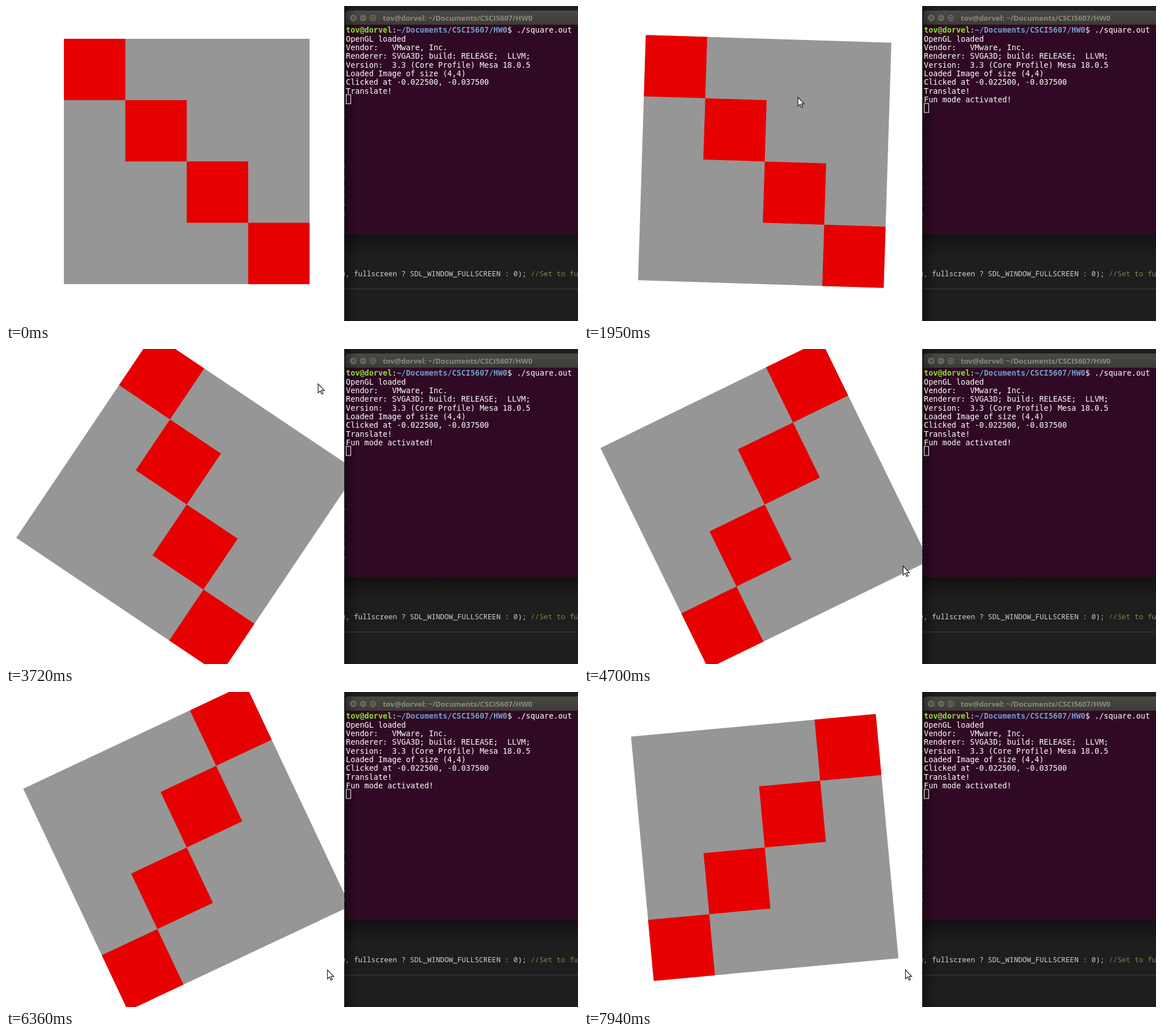
Recreate the animation shown at these times as an HTML page. Size 1008 px wide and 556 px high, loop 7990 ms.

```html
<!DOCTYPE html>
<html lang="en">
<head>
<meta charset="utf-8">
<title>Spinning square</title>
<style>
  html, body { margin: 0; width: 100%; height: 100%; overflow: hidden; background: #1e1e1e; }
  svg { display: block; width: 1008px; height: 556px; }
  text { white-space: pre; }
  .term { font: 13.5px "DejaVu Sans Mono", monospace; fill: #fff; }
  .user { font-weight: bold; fill: #8ae234; }
  .path { font-weight: bold; fill: #729fcf; }
  .title { font: 700 12.9px "Open Sans", sans-serif; fill: #8b8981; }
  .code { font: 12.68px "Noto Sans Mono", monospace; fill: #d4d4d4; }
</style>
</head>
<body>
<svg viewBox="0 0 1008 556">
  <defs>
    <linearGradient id="bar" x2="0" y2="1">
      <stop offset="0" stop-color="#4a4944"/>
      <stop offset="1" stop-color="#3c3b37"/>
    </linearGradient>
    <linearGradient id="below" x2="0" y2="1">
      <stop offset="0" stop-opacity=".4"/>
      <stop offset="1" stop-opacity="0"/>
    </linearGradient>
    <linearGradient id="beside">
      <stop offset="0" stop-opacity=".35"/>
      <stop offset="1" stop-opacity="0"/>
    </linearGradient>
    <clipPath id="view"><rect width="596" height="556"/></clipPath>
  </defs>

  <!-- editor behind the windows -->
  <rect x="596" width="412" height="556" fill="#1e1e1e"/>
  <rect x="596" y="403" width="412" height="40" fill="url(#below)"/>
  <path d="M596 499.5H1008" stroke="#444"/>
  <path d="M596 195.5h2M596 267h1M596 285l2 -4M596 302h2M596 321.5h2M596 337h2M596 353l2 -4M596 370l2 -4" stroke="#777"/>
  <text class="code" x="590.2" y="476.5">w, fullscreen ? SDL_WINDOW_FULLSCREEN : <tspan fill="#b5cea8">0</tspan>); <tspan fill="#6f8f4c">//Set to fullscreen</tspan></text>

  <!-- terminal -->
  <path d="M598 34V14q0 -6 6 -6H1008V34Z" fill="url(#bar)"/>
  <rect x="598" y="33" width="410" height="370" fill="#300a24"/>
  <rect x="596" width="24" height="556" fill="url(#beside)"/>
  <g fill="#69675f" stroke="#3a3934" stroke-width=".8">
    <circle cx="612" cy="21" r="6.3"/>
    <circle cx="629.3" cy="21" r="6.3"/>
    <circle cx="646.5" cy="21" r="6.3"/>
  </g>
  <path d="M609.500 18.500l5 5m0 -5l-5 5M626.300 21h6M644 18.500h5v5h-5z" fill="none" stroke="#3a3934" stroke-width="1.2"/>
  <text class="title" x="664" y="26.400">tov@dorvel: ~/Documents/CSCI5607/HW0</text>
  <g id="lines" class="term">
    <text x="599" y="47.300"><tspan class="user">tov@dorvel</tspan>:<tspan class="path">~/Documents/CSCI5607/HW0</tspan>$ ./square.out</text>
  </g>
  <rect id="caret" x="599.500" width="8" height="16" fill="none" stroke="#fff"/>

  <!-- drawing window -->
  <rect width="596" height="556" fill="#fff"/>
  <g clip-path="url(#view)">
    <g id="square"></g>
  </g>
  <path id="mouse" d="M.5 .5V16.500L4.300 13L6.800 18.800L9.200 17.800L6.700 12.200H11.500Z" fill="#fff" stroke="#1a1a1a" stroke-width="1.2"/>
</svg>
<script>
const LOOP = 7990, FUN = 1410;
const CENTER = [318.5, 274.4], CELL = 108.25;
const byId = id => document.getElementById(id);

function add(parent, tag, attrs, text = "") {
  const el = document.createElementNS("http://www.w3.org/2000/svg", tag);
  for (const name in attrs) el.setAttribute(name, attrs[name]);
  el.textContent = text;
  parent.appendChild(el);
  return el;
}

// Each key: time, steps taken since the previous key, values.
const spin = [
  [FUN, 1, 0], [1950, 12, 181.8], [2740, 17, 356.3], [3720, 21, 573.9],
  [5570, 40, 974.05], [7150, 34, 1315.5], [7940, 17, 1524.7]
];
const pointer = [
  [70, 1, 846, 458], [400, 7, 444, 17],
  [1030, 1, 413, 19], [1260, 5, 378, 149], [FUN, 1, 378, 149],
  [1950, 12, 376.5, 160.5], [2740, 17, 372, 211.5], [3720, 21, 549.5, 61],
  [5000, 28, 566, 490]
];

function sample(keys, t) {
  const i = keys.findIndex(key => key[0] > t);
  if (i === 0) return keys[0].slice(2);
  if (i < 0) return keys[keys.length - 1].slice(2);
  const a = keys[i - 1], b = keys[i];
  const k = Math.floor((t - a[0]) / (b[0] - a[0]) * b[1] + 1e-6) / b[1];
  return a.slice(2).map((v, n) => v + (b[n + 2] - v) * k);
}

const lines = [
  "OpenGL loaded",
  "Vendor:   VMware, Inc.",
  "Renderer: SVGA3D; build: RELEASE;  LLVM;",
  "Version:  3.3 (Core Profile) Mesa 18.0.5",
  "Loaded Image of size (4,4)",
  "Clicked at -0.022500, -0.037500",
  "Translate!",
  "Fun mode activated!"
].map((s, i) => add(byId("lines"), "text", { x: 599, y: 47.3 + 15.35 * (i + 1) }, s));
const funLine = lines[lines.length - 1];

const square = byId("square"), mouse = byId("mouse"), caret = byId("caret");
add(square, "rect", { x: -2 * CELL, y: -2 * CELL, width: 4 * CELL, height: 4 * CELL, fill: "#969696" });
for (let i = -2; i < 2; i++) {
  add(square, "rect", { x: i * CELL, y: i * CELL, width: CELL, height: CELL, fill: "#e60000" });
}

function draw(t) {
  const fun = t >= FUN;
  square.setAttribute("transform", `translate(${CENTER}) rotate(${sample(spin, t)})`);
  funLine.style.display = fun ? "" : "none";
  caret.setAttribute("y", fun ? 172 : 156.6);
  const shown = t >= 70 && t < 440 || t >= 1030;
  mouse.style.display = shown ? "" : "none";
  mouse.setAttribute("transform", `translate(${sample(pointer, t)})`);
}

const start = performance.now();
function tick() {
  draw((performance.now() - start) % LOOP);
  requestAnimationFrame(tick);
}
draw(0);
requestAnimationFrame(tick);
</script>
</body>
</html>
```
